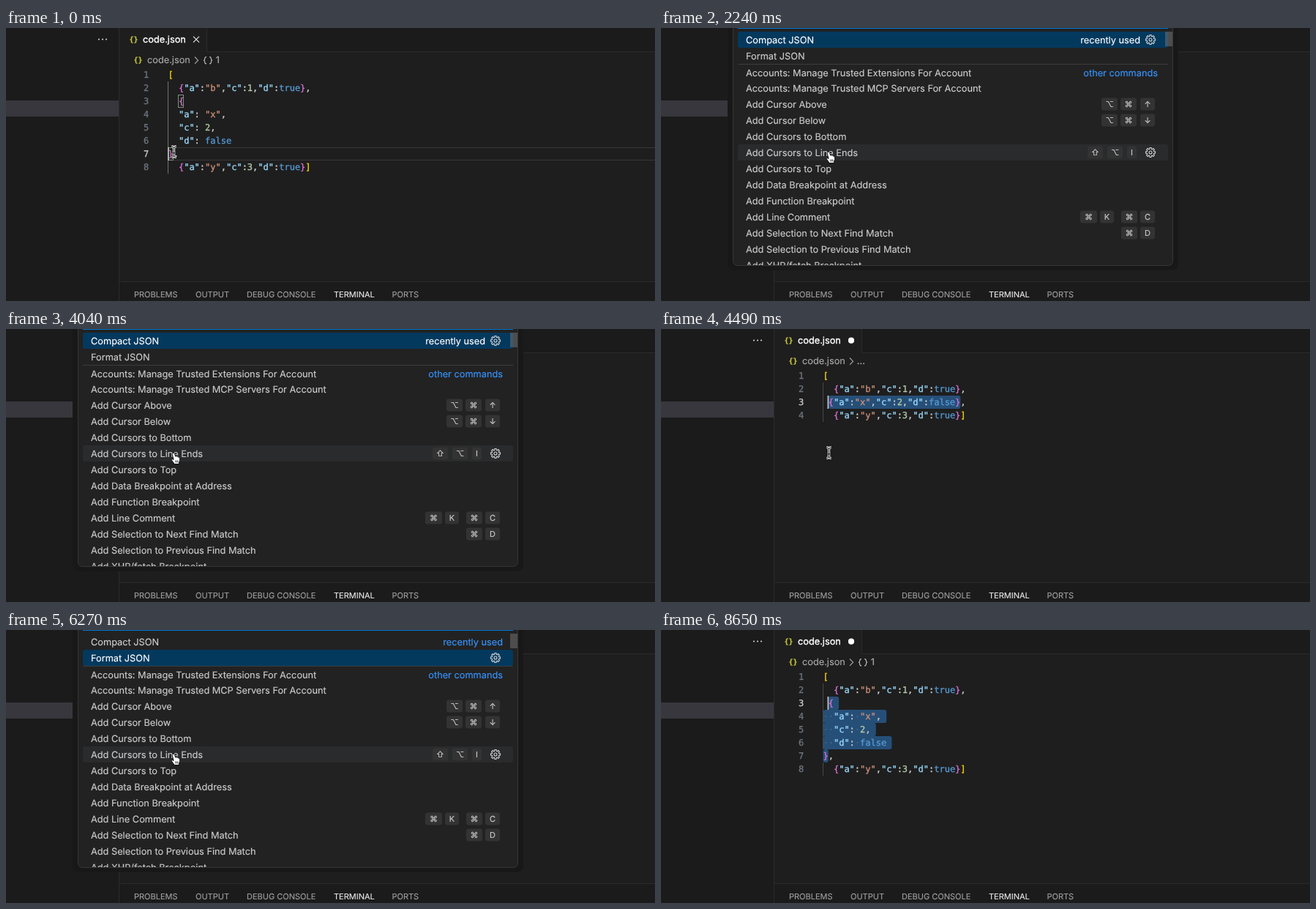
An HTML page that plays this animation: 887x373 px, repeating every 9100 ms.

```html
<!DOCTYPE html>
<html lang="en">
<head>
<meta charset="utf-8">
<title>Compact and format JSON</title>
<style>
  html, body { margin: 0; width: 100%; height: 100%; overflow: hidden; background: #1e1e1e; }
  svg { display: block; width: 100vw; height: 100vh; }
  text { font: 12.75px Inter, 'DejaVu Sans', sans-serif; text-rendering: geometricPrecision; white-space: pre; stroke-width: .15px; }
  .code { font: 12px 'DejaVu Sans Mono', monospace; stroke-width: .3px; }
  .icon { font: bold 10px 'DejaVu Sans Mono', monospace; }
  .title { stroke-width: .35px; }
  .small { font-size: 11px; }
  .key { font-size: 11px; text-anchor: middle; }
  .end { text-anchor: end; }
</style>
</head>
<body>
<svg id="stage" viewBox="0 0 887 373" xmlns="http://www.w3.org/2000/svg"></svg>
<script>
const LOOP = 9100, CW = 7.224, LH = 18, LEFT = 221.5, TOP = 55;
const stage = document.getElementById('stage');

// ---- Documents ----
const body = ['  "a": "x",', '  "c": 2,', '  "d": false', '},'];
const doc = middle => ['[', '  {"a":"b","c":1,"d":true},', ...middle, '  {"a":"y","c":3,"d":true}]'];
const docs = {
  start: { lines: doc(['  {', ...body]), end: [6, 1] },
  compact: { lines: doc([' {"a":"x","c":2,"d":false},']), end: [2, 26] },
  pretty: { lines: doc([' {', ...body]), end: [6, 1] }
};

// ---- Timeline: each step changes part of the state ----
const steps = [
  [0, { doc: 'start', line: 6, col: 0, select: false, caret: true, crumb: true,
        dirty: false, mouse: true, menu: -1, bar: false }],
  [150, { col: 1 }],
  [600, { line: 5, select: true }],
  [750, { line: 4 }],
  [1040, { line: 3 }],
  [1190, { line: 2 }],
  [1340, { crumb: false }],
  [1790, { caret: false }],
  [2090, { menu: 0 }],
  [2240, { bar: true }],
  [3140, { menu: 1 }],
  [4040, { menu: 0 }],
  [4490, { menu: -1, bar: false, doc: 'compact', dirty: true, caret: true }],
  [4940, { crumb: true, caret: false }],
  [5380, { caret: true }],
  [5680, { menu: 0 }],
  [5830, { bar: true }],
  [6270, { menu: 1 }],
  [6720, { menu: -1, bar: false, doc: 'pretty' }],
  [7320, { caret: false }],
  [7760, { caret: true }],
  [8210, { caret: false }],
  [8360, { mouse: false }],
  [8650, { caret: true }]
];
const stateAt = t => Object.assign({}, ...steps.filter(s => s[0] <= t).map(s => s[1]));

// ---- Drawing helpers ----
const rect = (x, y, w, h, fill, more = '') =>
  `<rect x="${x}" y="${y}" width="${w}" height="${h}" fill="${fill}" ${more}/>`;
const text = (x, y, str, fill, cls = '') =>
  `<text x="${x}" y="${y}" fill="${fill}" stroke="${fill}" class="${cls}">${str}</text>`;
const path = (d, stroke, width = 1, fill = 'none') =>
  `<path d="${d}" stroke="${stroke}" stroke-width="${width}" fill="${fill}"/>`;
const dot = (x, y, r, fill) => `<circle cx="${x}" cy="${y}" r="${r}" fill="${fill}"/>`;
const colX = c => LEFT + c * CW;
const lineY = n => TOP + n * LH;

function gear(x, y) {
  const pts = [];
  for (let i = 0; i < 8; i++) {
    for (const [off, r] of [[-.26, 4.9], [-.17, 6.6], [.17, 6.6], [.26, 4.9]]) {
      const a = i * Math.PI / 4 + off;
      pts.push((x + r * Math.cos(a)).toFixed(2) + ' ' + (y + r * Math.sin(a)).toFixed(2));
    }
  }
  return path('M' + pts.join('L') + 'Z', '#d0d0d0', 1.1) +
    `<circle cx="${x}" cy="${y}" r="2" fill="none" stroke="#d0d0d0" stroke-width="1.1"/>`;
}

// ---- Editor ----
const colours = [
  [/^"\w"$/, '#ce9178'], [/^"\w":$/, '#9cdcfe'], [/^\d$/, '#b5cea8'],
  [/^[a-z]+$/, '#569cd6'], [/^[[\]]$/, '#ffd700'], [/^[{}]$/, '#da70d6']
];
const colourOf = token => (colours.find(c => c[0].test(token)) || [0, '#cccccc'])[1];

function codeLine(str, n) {
  let out = '';
  for (const m of str.matchAll(/"\w"|\d|[a-z]+|[^\s]/g)) {
    const isKey = m[0].length === 3 && str[m.index + 3] === ':';
    out += text(colX(m.index), lineY(n) + 12.8, m[0], colourOf(isKey ? m[0] + ':' : m[0]), 'code');
  }
  return out;
}

function selection(s, lines, [endLine, endCol]) {
  let out = '';
  for (let n = s.line; n <= endLine; n++) {
    const from = n === s.line ? s.col : 0;
    const to = n === endLine ? endCol : lines[n].length;
    const w = (to - from + (n < endLine ? 1 : 0)) * CW;
    out += rect(colX(from), lineY(n), w, LH, '#264f78', 'rx="3"');
    for (let c = from; c < to; c++)
      if (lines[n][c] === ' ') out += dot(colX(c + .5), lineY(n) + 9, .8, '#58789a');
  }
  return out;
}

function guides(s, lines) {
  const stroke = s.select ? '#484848' : '#707070';
  return lines.map((str, n) => str[0] === ' '
    ? rect(221, lineY(n), 1, LH, stroke) : '').join('');
}

const bracketBox = (c, n) =>
  rect(Math.floor(colX(c)) + .5, lineY(n) + .5, 7, LH - 1, 'rgba(0,100,0,.1)', 'stroke="#888"');

function editor(s) {
  const { lines, end } = docs[s.doc];
  let out = '';
  if (s.select) out += selection(s, lines, end);
  else out += rect(221.5, lineY(s.line) + .5, 680, LH - 1, 'none', 'stroke="#383838"');
  out += guides(s, lines);
  if (!s.select) out += bracketBox(2, 2) + bracketBox(0, 6);
  lines.forEach((str, n) => {
    out += text(195.3, lineY(n) + 12.8, n + 1, n === s.line ? '#cccccc' : '#6e7681', 'code end');
    out += codeLine(str, n);
  });
  if (s.caret) out += rect(colX(s.col) - (s.col ? 1.2 : .5), lineY(s.line), 1.7, LH, '#c4c5c3');
  return out;
}

// ---- Window around the editor ----
function frame(s) {
  const line = '#2b2b2b', yellow = '#cbcb41';
  let out = rect(0, 0, 887, 373, '#1e1e1e') + rect(0, 0, 154, 373, '#1b1b1b') +
    rect(275, 0, 612, 32, '#1b1b1b') + rect(155, 347, 732, 26, '#1b1b1b') +
    rect(154, 0, 1, 373, line) + rect(274, 0, 1, 33, line) +
    rect(275, 32, 612, 1, line) + rect(155, 346, 732, 1, line) +
    rect(0, 99, 154, 22, '#37373d');
  for (const x of [127, 132, 137]) out += dot(x, 15.5, 1.1, '#cccccc');

  out += text(168.6, 18.9, '{}', yellow, 'icon') + text(187, 20, 'code.json', '#ffffff', 'title');
  out += s.dirty ? dot(260, 15.7, 4.1, '#ffffff') : path('M256 11.6l8 8M264 11.6l-8 8', '#e0e0e0', 1.2);

  out += text(174.6, 47.3, '{}', yellow, 'icon') + text(193, 48.4, 'code.json', '#a9a9a9') +
    path('M258 39.5l4.5 4.7l-4.5 4.7', '#a9a9a9', 1.1);
  out += s.crumb
    ? path('M274 39.5q-2.3 0-2.3 2.4q0 2.2-1.7 2.3q1.7.1 1.7 2.3q0 2.4 2.3 2.4' +
        'M278 39.5q2.3 0 2.3 2.4q0 2.2 1.7 2.3q-1.7.1-1.7 2.3q0 2.4-2.3 2.4', '#c8c8c8', 1.1) +
      text(286.8, 48.4, '1', '#b4b4b4')
    : text(267.8, 48.4, '...', '#b4b4b4');

  const tabs = [[175, 'PROBLEMS'], [259, 'OUTPUT'], [329, 'DEBUG CONSOLE'], [448, 'TERMINAL'], [527.5, 'PORTS']];
  for (const [x, name] of tabs)
    out += text(x, 368, name, name === 'TERMINAL' ? '#e7e7e7' : '#9d9d9d', 'small');
  return out;
}

// ---- Command palette ----
const commands = [
  'Compact JSON', 'Format JSON',
  'Accounts: Manage Trusted Extensions For Account',
  'Accounts: Manage Trusted MCP Servers For Account',
  'Add Cursor Above', 'Add Cursor Below', 'Add Cursors to Bottom',
  'Add Cursors to Line Ends', 'Add Cursors to Top',
  'Add Data Breakpoint at Address', 'Add Function Breakpoint',
  'Add Line Comment', 'Add Selection to Next Find Match',
  'Add Selection to Previous Find Match', 'Add XHR/fetch Breakpoint'
];
// row: [label, left, width] per key
const keys = {
  4: [['⌥', 602, 22], ['⌘', 628, 22], ['↑', 655, 20]],
  5: [['⌥', 602, 22], ['⌘', 628, 22], ['↓', 655, 20]],
  7: [['⇧', 583, 21], ['⌥', 610, 21], ['I', 637, 13]],
  11: [['⌘', 573, 23], ['K', 600, 19], ['⌘', 629, 22], ['C', 655, 20]],
  12: [['⌘', 629, 22], ['D', 655, 20]]
};
const HOVER = 7;

function palette(s) {
  const blue = '#3794ff';
  const row = (i, fill) => rect(105, 5 + 22 * i, 588, 22, fill, 'rx="3"');
  let out = rect(91, -20, 616, 351, '#181818', 'rx="9"') +
    rect(98.5, -20, 601, 344.5, '#222222', 'rx="6" stroke="#363636"');
  out += rect(105, -1, 588, 2, '#0078d4') + rect(105, 49, 588, 1, '#3c3c3c');
  out += row(s.menu, '#04395e') + row(HOVER, '#2a2b2d');

  let rows = '';
  commands.forEach((name, i) => {
    const y = 16 + 22 * i + (i === 2 ? 1.3 : 0);
    rows += text(116, y + 4.6, name, i === s.menu ? '#ffffff' : '#cccccc');
    for (const [label, x, w] of keys[i] || [])
      rows += rect(x, y - 8.5, w, 17, '#333333', 'rx="3"') +
        text(x + w / 2, y + 4, label, '#cccccc', 'key');
  });
  out += `<clipPath id="list"><rect x="99" y="0" width="600" height="324"/></clipPath>` +
    `<g clip-path="url(#list)">${rows}</g>`;

  out += s.menu === 0
    ? text(655, 20.6, 'recently used', '#ffffff', 'end')
    : text(679, 20.6, 'recently used', blue, 'end');
  out += text(679, 65.6, 'other commands', blue, 'end');
  out += gear(669, 16 + 22 * s.menu) + gear(669, 16 + 22 * HOVER);
  if (s.bar) out += rect(689, 5, 10, 20, 'rgba(121,121,121,.5)');
  return out;
}

// ---- Mouse ----
function beam() {
  const d = 'M226.3 161.8q3.2 0 3.2 2.6v9.6q0 2.6-3.2 2.6M232.7 161.8q-3.2 0-3.2 2.6v9.6q0 2.6 3.2 2.6M227.8 170.8h3.4';
  return path(d, '#ffffff', 3) + path(d, '#000000', 1);
}

function hand() {
  const outline = 'M4.3 1.2c1-.5 2 0 2.3 1l1 3.6c.8-.5 1.8-.3 2.2.4c.9-.4 1.7 0 2 .7' +
    'c1-.2 1.7.4 1.7 1.5c.2 2.3 0 3.7-1 5.5l-.2 2.3H6.2c-.8-1.6-2.6-3.2-3.7-5.3' +
    'c-.6-1.2.6-2 1.6-1.3l1 .9l-1.9-7.6c-.2-.8.3-1.4 1.1-1.7z';
  return `<g transform="translate(224 168.3)">${path(outline, '#000000', .9, '#ffffff')}` +
    path('M7.7 11.2v3M9.3 11.2v3M10.9 11.2v3', '#000000', .7) + '</g>';
}

function render(s) {
  const open = s.menu >= 0;
  return frame(s) + editor(s) + (open ? palette(s) : '') +
    (s.mouse ? (open ? hand() : beam()) : '');
}

let shown = '';
const begin = performance.now();
function tick() {
  const s = stateAt((performance.now() - begin) % LOOP);
  const key = JSON.stringify(s);
  if (key !== shown) {
    shown = key;
    stage.innerHTML = render(s);
  }
  requestAnimationFrame(tick);
}
tick();
</script>
</body>
</html>
```
